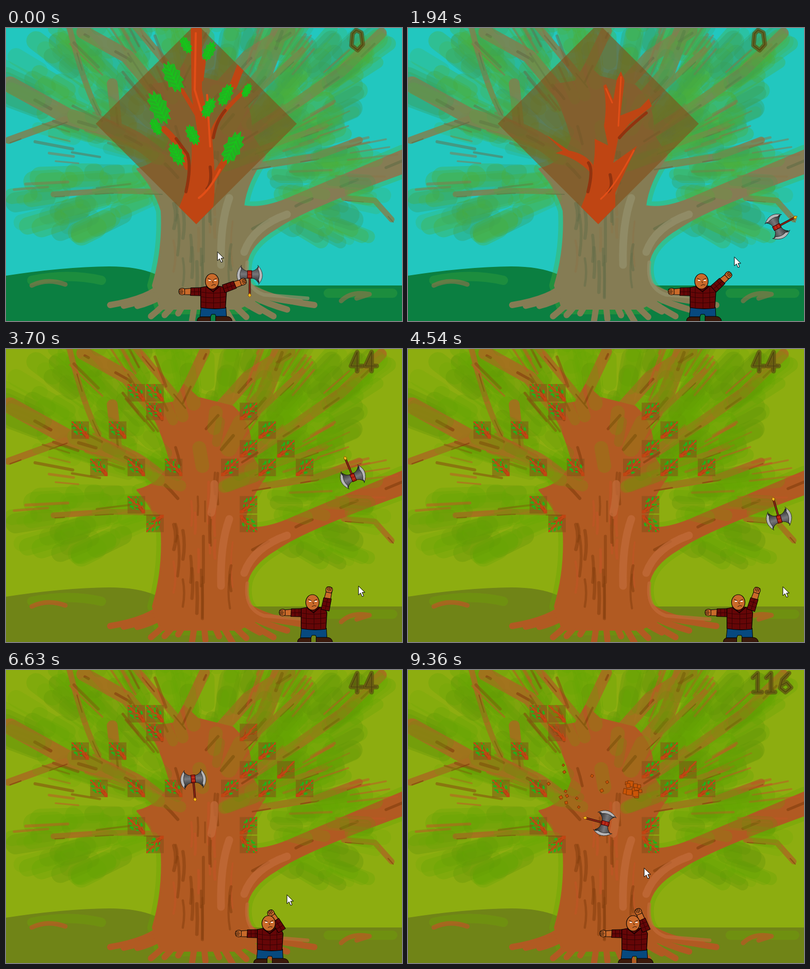
Recreate the animation shown at these times as an HTML page with a canvas. Size 768 by 569 pixels, loop 9.39 s.

```html
<!DOCTYPE html>
<html lang="en">
<head>
<meta charset="utf-8">
<title>Axe and tree</title>
<style>
html, body { margin: 0; width: 100%; height: 100%; overflow: hidden; background: #8dad10; }
canvas { display: block; width: 100vw; height: 100vh; }
</style>
</head>
<body>
<canvas id="stage" width="768" height="569"></canvas>
<script>
const W = 768, H = 569, LOOP = 9390, LEVEL_UP = 2600, TAU = Math.PI * 2;
const ctx = document.getElementById('stage').getContext('2d');

function seeded(seed) {
  return () => {
    seed = (seed * 1664525 + 1013904223) >>> 0;
    return seed / 4294967296;
  };
}

const mix = (a, b, k) => a + (b - a) * k;

function line(c, d, color, width, alpha = 1) {
  c.globalAlpha = alpha;
  c.strokeStyle = color;
  c.lineWidth = width;
  c.lineCap = c.lineJoin = 'round';
  c.stroke(new Path2D(d));
  c.globalAlpha = 1;
}

function shape(c, d, color, outline, width = 1) {
  c.fillStyle = color;
  c.fill(new Path2D(d));
  if (outline) line(c, d, outline, width);
}

// Linear interpolation of rows [time, a, b, ...]
function track(rows, t) {
  const i = rows.findIndex(r => r[0] > t);
  if (i === 0) return rows[0].slice(1);
  if (i < 0) return rows[rows.length - 1].slice(1);
  const a = rows[i - 1], b = rows[i], k = (t - a[0]) / (b[0] - a[0]);
  return a.slice(1).map((v, n) => mix(v, b[n + 1], k));
}

// ---- painted tree -------------------------------------------------------
const DAY = {
  sky: '#22c7bf', ground: '#0b7f41', moss: '#2b9a3c', bush: '#4bae3a', shade: '#389a58',
  wood: '#857c54', limb: '#7f8050', dark: '#656d48', light: '#94906c', twig: '#8a7449'
};
const DUSK = {
  sky: '#8dad10', ground: '#708417', moss: '#6f9c0c', bush: '#66a404', shade: '#5f9208',
  wood: '#b15a22', limb: '#a86c20', dark: '#85400f', light: '#c26a38', twig: '#c25426'
};
// Canopy ellipses: x, y, rx, ry
const CANOPY = [[350, 110, 330, 155], [150, 335, 125, 62], [620, 320, 100, 90], [660, 50, 70, 50], [580, 200, 80, 80]];
const TRUNK = 'M285 500Q306 430 302 355Q288 310 255 274Q305 262 318 215Q300 150 275 112L325 104L345 70L372 95' +
  'L440 112Q480 150 474 205L502 248Q465 300 460 346Q500 354 560 326L768 238V282Q575 352 525 388' +
  'Q470 420 466 460Q462 508 500 520L450 545H300Z';
// Limbs from thick to thin
const LIMBS = [
  ['M330 285Q270 215 200 195L120 172L8 110M415 190L500 90L535 -5', 32],
  ['M335 220Q320 150 285 115L235 55L150 8M385 150L470 55L548 5M475 385L570 335L768 252', 27],
  ['M214 185L206 108M340 100L385 5M455 215L550 155L650 85L728 10', 21],
  ['M115 178L5 218M345 110L250 -5M475 270L600 250L685 218', 14],
  ['M180 165Q150 110 122 -5M460 150L575 42M480 240L620 190M655 330L715 335L748 372M300 318L200 316L92 323', 11]
];

function paintTree(p) {
  const layer = document.createElement('canvas');
  layer.width = W;
  layer.height = H;
  const c = layer.getContext('2d'), rnd = seeded(71);
  c.fillStyle = p.sky;
  c.fillRect(0, 0, W, H);
  shape(c, 'M0 481Q110 464 200 463Q255 463 290 478L465 500H768V569H0Z', p.ground);
  line(c, 'M50 490Q120 475 185 490M625 515H750', p.moss, 18, .55);
  line(c, 'M50 500Q80 485 115 498M650 530Q670 510 705 517L680 525', p.twig, 9, .65);

  // Broad brush strokes that point away from the trunk
  const foliage = (density, alpha, width) => CANOPY.forEach(([x, y, rx, ry]) => {
    for (let i = 0; i < rx * ry * density; i++) {
      const a = rnd() * TAU, r = Math.sqrt(rnd());
      const px = x + Math.cos(a) * rx * r, py = y + Math.sin(a) * ry * r;
      const aim = Math.atan2(py - 280, px - 390), len = 15 + rnd() * 20;
      const dx = Math.cos(aim) * len, dy = Math.sin(aim) * len;
      line(c, `M${px - dx} ${py - dy}L${px + dx} ${py + dy}`, rnd() < .35 ? p.shade : p.bush, width * mix(.6, 1.2, rnd()), alpha);
    }
  });

  foliage(.0035, .33, 36);
  line(c, TRUNK, p.bush, 22, .35);
  for (let i = 0; i < 16; i++) {
    const s = i / 7.5 - 1;
    line(c, `M${385 + s * 78} 495Q${390 + s * 110} 525 ${400 + s * 198} ${572 - 34 * s * s - (i % 3) * 7}`, p.wood, 12);
  }
  LIMBS.forEach(([d, width]) => line(c, d, p.limb, width, .85));
  shape(c, TRUNK, p.wood);
  line(c, TRUNK, p.wood, 4);

  c.save();
  c.translate(3, 5);
  c.setLineDash([35, 60]);
  LIMBS.forEach(([d, width]) => line(c, d, p.dark, width * .2, .65));
  c.restore();

  for (let i = 0; i < 60; i++) {
    const side = i % 2 ? 1 : -1, a = mix(-1.25, .12, rnd());
    const r = mix(150, 310, rnd()), len = mix(30, 100, rnd());
    const x = 390 + side * Math.cos(a) * r, y = 285 + Math.sin(a) * r;
    line(c, `M${x} ${y}l${side * Math.cos(a) * len} ${Math.sin(a) * len}`, i % 4 ? p.twig : p.dark, mix(3, 6, rnd()), .5);
  }
  foliage(.0016, .2, 28);

  for (let i = 0; i < 30; i++) {
    const x = mix(318, 450, rnd()), y = mix(240, 460, rnd()), len = mix(30, 90, rnd());
    const bend = (385 - x) * .12;
    line(c, `M${x} ${y}q${bend} ${len / 2} 0 ${len}`, i % 3 ? p.dark : p.twig, mix(3, 7, rnd()), .55);
  }
  line(c, 'M404 262Q405 290 398 318M433 330Q415 380 417 460M545 362Q480 385 462 435', p.light, 15, .75);
  line(c, 'M468 455Q462 505 500 518L585 525', p.light, 7, .7);
  return layer;
}
const scenes = [paintTree(DAY), paintTree(DUSK)];

// ---- branch tiles -------------------------------------------------------
// Leaves: x, y, half length
const LEAVES = [
  [349, 33, 17], [394, 45, 19], [324, 95, 31], [426, 130, 22], [467, 121, 14], [297, 155, 33],
  [291, 192, 17], [362, 208, 20], [393, 155, 20], [331, 245, 23], [440, 232, 32]
];

function leaf(c, [x, y, len]) {
  c.save();
  c.translate(x, y);
  c.rotate(x < 375 ? 1.1 : -1.1);
  let rim = '', veins = `M${-len * .8} 0H${len * .8}`;
  for (let i = 0; i < 22; i++) {
    const a = i / 22 * TAU, r = i % 2 ? .76 : 1.06;
    rim += `${i ? 'L' : 'M'}${Math.cos(a) * len * r} ${Math.sin(a) * len * .52 * r}`;
  }
  for (let i = -2; i < 3; i++) {
    const v = i * len * .28;
    veins += `M${v - len * .2} ${-len * .32}L${v + 4} 0L${v - len * .2} ${len * .32}`;
  }
  shape(c, rim + 'Z', '#25ae22', '#16c21a', 1.5);
  line(c, veins, '#14c818', 1.6);
  c.restore();
}

function branchArt(c, damage, veil) {
  const red = '#bf4513', dark = '#91330f', hot = '#e24e17';
  c.save();
  c.clip(new Path2D('M369 -9L564 186L369 381L174 186Z'));
  c.globalAlpha = veil;
  c.fillStyle = '#824e16';
  c.fillRect(170, -10, 400, 400);
  c.globalAlpha = 1;
  if (damage < 2) {
    line(c, 'M352 270Q338 222 306 196M378 330L424 258', red, 12);
    line(c, 'M372 172L342 122M396 210Q412 165 470 116M379 100L384 62L402 38', red, 8);
    line(c, 'M441 112L460 62', red, 15);
    shape(c, 'M335 350Q363 285 360 230L371 200L360 130L358 -9H380V120L400 215Q408 300 402 347L369 381Z', red);
    line(c, 'M349 318Q360 270 352 245L330 215M402 213Q408 180 425 160M396 270Q400 300 390 312', dark, 6);
    line(c, 'M368 10L366 120L378 160M390 130L396 230M374 330Q395 315 415 275', hot, 4);
  } else {
    shape(c, 'M335 350Q366 275 362 215L378 223L388 228L380 190Q387 150 379 112L384 109L398 140L405 100L413 84' +
      'L420 102L412 170L450 155L467 137L473 152L430 185L408 213L398 262L444 229L402 320L402 347L369 381Z', red);
    shape(c, 'M356 283Q325 250 286 243L300 238L267 207L312 238Q345 244 359 266Z', red);
    line(c, 'M349 318Q360 275 350 262M410 213Q425 195 462 165M392 285Q398 310 388 318', dark, 6);
    line(c, 'M413 95L408 190M374 332Q400 310 438 238M384 118L396 145', hot, 3);
  }
  if (damage === 0) LEAVES.forEach(l => leaf(c, l));
  c.restore();
}

const GRID = ['...##', '....#....#', '#.#.......#', '.........#.#', '.#.#.#..#.#.#', '', '...#.....#', '....#....#'];
// Times of the blows on each struck tile; the third blow destroys it
const BLOWS = {
  '11,3': [6050], '9,1': [6200, 8150, 8190], '4,0': [6900], '4,1': [7000],
  '5,4': [6700, 6850, 8640], '8,4': [7300, 7540, 9290]
};
const BIG_BLOWS = [627, 1381, 2135];
const damageAt = (blows, t) => blows.filter(at => at <= t).length;

function drawTile(col, row, t) {
  const blows = BLOWS[[col, row]] || [], damage = damageAt(blows, t);
  const x = 144 + col * 36.25, y = 85 + row * 36.25;
  if (damage > 2) return debris(x, y, t - blows[2], col + row * 13);
  const turn = row === 7 ? 3 : 1;
  ctx.save();
  ctx.translate(x, y);
  ctx.rotate((col < 7 ? -turn : turn) * Math.PI / 4);
  ctx.scale(.1235, .1235);
  ctx.translate(-369, -186);
  branchArt(ctx, damage, .5);
  ctx.restore();
}

function debris(x, y, age, seed, size = 1) {
  if (age > 1000) return;
  const rnd = seeded(seed), fade = 1 - age / 1400;
  for (let i = 0; i < 12; i++) {
    const a = rnd() * TAU, v = (.03 + rnd() * .08) * size;
    const ox = (rnd() - .5) * 24 * size, oy = (rnd() - .5) * 28 * size;
    const s = (6 + rnd() * 6) * size * fade;
    ctx.save();
    ctx.translate(x + ox + Math.cos(a) * v * age, y + oy + Math.sin(a) * v * age * .6);
    ctx.rotate(age * .005 * (rnd() - .5));
    shape(ctx, `M${-s / 2} ${-s / 2}h${s}v${s}h${-s}Z`, '#cb5508', '#7c3606');
    ctx.restore();
  }
}

// ---- score --------------------------------------------------------------
const DIGITS = {
  0: 'M8 10L15 3L25 8L28 31L18 42L6 33Z',
  1: 'M5 14L14 5V42M6 42H22',
  2: 'M6 12L15 4L25 12L7 41H27',
  4: 'M17 42V5L5 32H27',
  6: 'M23 5L10 18L6 34L16 42L27 33L18 23L9 28',
  8: 'M16 4L26 13L6 32L16 42L26 32L6 13Z'
};

function drawScore(t) {
  const big = damageAt(BIG_BLOWS, t) > 2 ? 44 : 0;
  const gone = Object.values(BLOWS).filter(b => b[2] <= t).length;
  const text = String(big + (gone ? 30 + gone * 14 : 0));
  [...text].forEach((digit, i) => {
    ctx.save();
    ctx.translate(664 + i * (text.length > 2 ? 26 : 28), 1);
    line(ctx, DIGITS[digit], '#4f430d', 9, .6);
    line(ctx, DIGITS[digit], '#6e6018', 5.5, .6);
    line(ctx, DIGITS[digit], '#40350a', 1.2, .8);
    ctx.restore();
  });
}

// ---- moving parts -------------------------------------------------------
const POINTER = [
  [0, 410, 435], [1750, 633, 445], [1960, 633, 445], [2500, 535, 455], [2990, 529, 456], [3900, 727, 462],
  [5100, 727, 462], [6630, 545, 437], [7500, 476, 397], [9360, 458, 385]
];
// The axe bounces evenly between the hand and a ceiling
const HAND = 478;
const FLIGHTS = [
  { start: 250, end: 2512, half: 377, top: 290, spin: .569 },
  { start: 3340, end: LOOP, half: 717, top: 25, spin: .436 }
];
const DRIFT = [
  [250, 481], [627, 456], [1381, 510], [1940, 716], [2135, 490], [2512, 567],
  [3340, 610], [4050, 735], [5200, 700], [6750, 335], [7620, 462], [9360, 383]
];

function axeAt(t, manX) {
  const flight = FLIGHTS.find(f => t >= f.start && t < f.end);
  if (!flight) return { x: manX + 73, y: HAND, angle: 0 };
  const age = t - flight.start, phase = age / flight.half % 2;
  const height = 1 - Math.abs(1 - phase);
  return { x: track(DRIFT, t)[0], y: mix(HAND, flight.top, height), angle: age * flight.spin };
}

function drawAxe({ x, y, angle }) {
  ctx.save();
  ctx.translate(x, y);
  ctx.rotate(angle * Math.PI / 180);
  line(ctx, 'M0 0V40', '#1a0a05', 4);
  line(ctx, 'M0 0V40', '#8f2415', 2.4);
  const steel = ctx.createLinearGradient(0, -14, 0, 14);
  steel.addColorStop(0, '#3c3c3e');
  steel.addColorStop(.5, '#77777a');
  steel.addColorStop(1, '#303032');
  for (const side of [1, -1]) {
    ctx.save();
    ctx.scale(side, 1);
    shape(ctx, 'M2 -6Q11 -5 17 -15Q25 1 17 17Q11 7 2 8Z', steel, '#111', .8);
    shape(ctx, 'M16 -17Q33 2 17 20Q20 16 17 11Q21 1 16 -10Q18 -14 16 -17Z', '#b6b6b8', '#222', .8);
    ctx.restore();
  }
  shape(ctx, 'M-4 -7H4V8H-4Z', '#a81c12', '#300', 1);
  line(ctx, 'M-3 -2H3M-3 4H3', '#e04a20', 1);
  shape(ctx, 'M0 37L3 41L0 45L-3 41Z', '#ffc21a', '#8a4a00', .8);
  ctx.restore();
}

// Arm reaching along +x from the shoulder
function drawArm(x, y, angle, flip = 1) {
  ctx.save();
  ctx.translate(x, y);
  ctx.rotate(angle);
  ctx.scale(1, flip);
  shape(ctx, 'M16 -6L35 -5V6L16 7Z', '#c96a2a', '#000', 1);
  shape(ctx, 'M33 -5Q38 -8 43 -5Q46 0 43 5Q38 8 33 5Z', '#c96a2a', '#000', 1);
  line(ctx, 'M37 -3H43M36 0H44M37 3H43', '#000', 1);
  shape(ctx, 'M-2 -7L21 -7L22 8L-2 9Z', '#650607', '#000', 1);
  line(ctx, 'M6 -6V8M14 -6V8M0 1H21', '#350203', 1);
  ctx.restore();
}

function drawMan(x, axe) {
  ctx.save();
  ctx.translate(x, 0);
  shape(ctx, 'M-21 542H27L28 561H8L6 556H-1L-3 561H-23Z', '#07497f', '#000', 1);
  shape(ctx, 'M-29 569Q-29 561 -20 561H-3V569ZM7 569V560H27Q38 560 39 569Z', '#3c1a0c', '#000', 1);
  drawArm(-20, 511, Math.PI - .02, -1);
  shape(ctx, 'M-22 504Q0 498 24 503L28 512L26 544Q2 547 -22 543Z', '#650607', '#000', 1.2);
  line(ctx, 'M-20 513Q2 517 26 513M-21 522Q2 526 26 522M-21 532Q2 536 26 532M-12 504V543M3 510V544M16 504V543', '#340203', 1);
  drawArm(24, 505, Math.atan2(axe.y + 10 - 505, axe.x - x - 24));
  line(ctx, 'M-10 503L2 512L14 502', '#180000', 2);
  shape(ctx, 'M-13 492A13 15 0 1 1 13 492A13 15 0 1 1 -13 492Z', '#c96a2a', '#000', 1.2);
  line(ctx, 'M-6 490H-3M5 490H8', '#fff', 2);
  line(ctx, 'M-8 486L-2 489M3 489L9 486M1 492L2 495M-1 500Q3 497 7 499', '#2a1005', 1);
  ctx.restore();
}

function drawPointer([x, y]) {
  ctx.save();
  ctx.translate(x, y);
  shape(ctx, 'M0 0V17L4 13L7 20L10 19L7 12H12Z', '#fff', '#000', 1);
  ctx.restore();
}

function render(t) {
  const dusk = t >= LEVEL_UP;
  ctx.drawImage(scenes[dusk ? 1 : 0], 0, 0);
  if (dusk) {
    GRID.forEach((cells, row) => [...cells].forEach((cell, col) => cell === '#' && drawTile(col, row, t)));
  } else {
    const damage = damageAt(BIG_BLOWS, t);
    if (damage < 3) branchArt(ctx, damage, .6);
    else debris(369, 186, t - BIG_BLOWS[2], 5, 7);
  }
  drawScore(t);

  // The man trails the pointer, and his arm aims at the axe
  const manX = 88 + .76 * track(POINTER, Math.max(0, t - 80))[0];
  const axe = axeAt(t, manX);
  drawAxe(axe);
  drawMan(manX, axe);
  drawPointer(track(POINTER, t));
}

const start = performance.now();
function tick(now) {
  render(Math.max(0, now - start) % LOOP);
  requestAnimationFrame(tick);
}
render(0);
requestAnimationFrame(tick);
</script>
</body>
</html>
```
